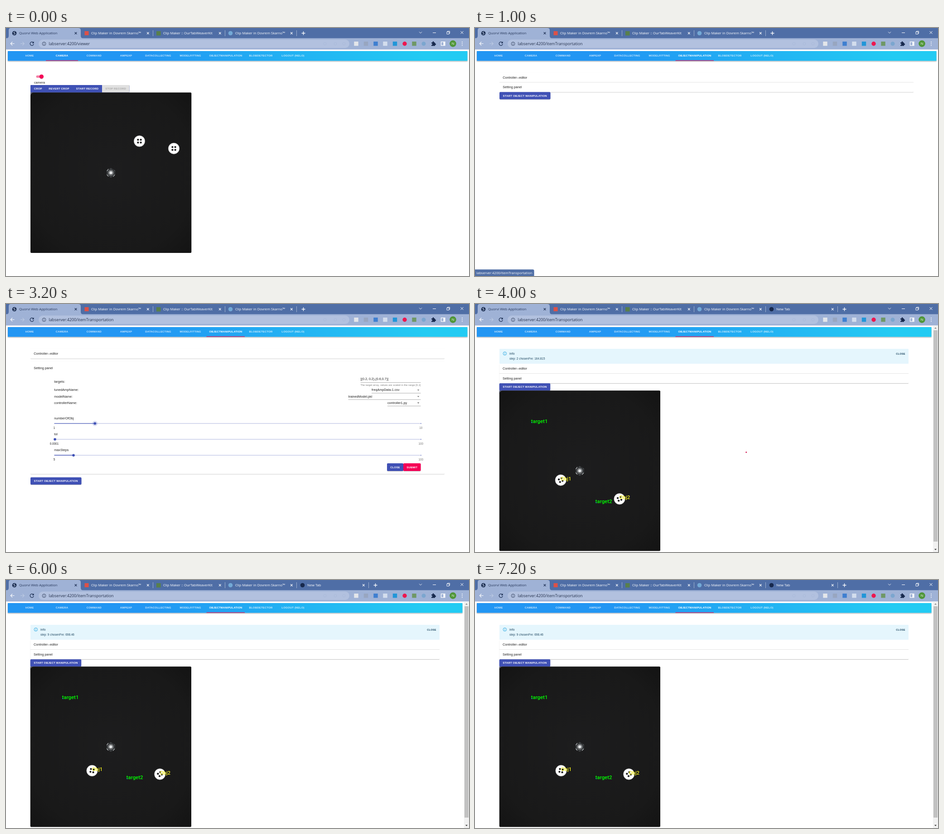
Recreate the animation shown at these times as an HTML page. Size 1022 by 548 pixels, loop 8 s.

```html
<!DOCTYPE html>
<html lang="en">
<head>
<meta charset="utf-8">
<title>Camera control</title>
<style>
html, body { margin: 0; width: 100%; height: 100%; overflow: hidden; background: #fff; }
svg { display: block; width: 100%; height: 100%; }
text { font: 7.2px "Liberation Sans", Arial, sans-serif; fill: #222; white-space: pre; }
.ui { font-family: "Open Sans", "Noto Sans", sans-serif; }
.btn { font-weight: bold; letter-spacing: .03em; text-anchor: middle; }
.mid { text-anchor: middle; }
.mark { font: 500 11.4px Roboto, sans-serif; }
</style>
</head>
<body>
<svg id="stage" viewBox="0 0 1022 548" xmlns="http://www.w3.org/2000/svg">
  <defs>
    <linearGradient id="bar" gradientUnits="userSpaceOnUse" x1="407" y1="165" x2="718" y2="-146">
      <stop stop-color="#2196f3"/><stop offset="1" stop-color="#21cbf3"/>
    </linearGradient>
    <radialGradient id="felt" r=".75">
      <stop stop-color="#1d1d1e"/><stop offset=".7" stop-color="#191919"/><stop offset="1" stop-color="#121212"/>
    </radialGradient>
    <radialGradient id="steel">
      <stop stop-color="#fff"/><stop offset=".35" stop-color="#d5d8da"/>
      <stop offset=".6" stop-color="#77797b"/><stop offset="1" stop-color="#46484a"/>
    </radialGradient>
    <filter id="shade" x="-5%" y="-30%" width="110%" height="190%">
      <feDropShadow dx="0" dy="1.2" stdDeviation="1.1" flood-color="#000" flood-opacity=".38"/>
    </filter>
    <filter id="lift" x="-5%" y="-20%" width="110%" height="150%">
      <feDropShadow dx="0" dy=".7" stdDeviation=".5" flood-color="#000" flood-opacity=".35"/>
    </filter>
  </defs>
  <g id="view"></g>
</svg>
<script>
const BLUE = '#3f51b5', PINK = '#f50057', FRAME = '#4f6ea6', TOOL = '#9fb2d6', NAVY = '#17294d';
const HOST = 'labserver:4200/';

const rect = (x, y, w, h, fill, more = '') =>
  `<rect x="${x}" y="${y}" width="${w}" height="${h}" fill="${fill}" ${more}/>`;
const disc = (x, y, r, fill, more = '') => `<circle cx="${x}" cy="${y}" r="${r}" fill="${fill}" ${more}/>`;
const line = (d, stroke, w = 1, more = '') =>
  `<path d="${d}" fill="none" stroke="${stroke}" stroke-width="${w}" ${more}/>`;
const text = (x, y, s, size = 7.2, fill = '#222', cls = '', more = '') =>
  `<text x="${x}" y="${y}" class="${cls}" style="font-size:${size}px;fill:${fill}" ${more}>${s}</text>`;
const cross = (x, y, r, color, w) => line(`M${x - r} ${y - r}l${2 * r} ${2 * r}m0 ${-2 * r}l${-2 * r} ${2 * r}`, color, w);

function button(x, y, w, h, label, fill = BLUE, color = '#fff', flat) {
  return rect(x, y, w, h, fill, flat ? '' : 'rx="2" filter="url(#lift)"') +
    text(x + w / 2, y + h / 2 + 2, label, 6, color, 'btn');
}

function tabs(extra) {
  const title = (x, s, fill = '#fff') => text(x, 14, s, 7.7, fill, 'ui');
  let out = rect(0, 0, 1022, 23, FRAME) +
    `<path d="M0 23Q6 23 6 17V5Q6 0 11 0H159Q165 0 165 5V17Q165 23 171 23Z" fill="${TOOL}"/>` +
    disc(18.5, 11.5, 4.8, NAVY) + line('M15.5 9.5l3 1 1-2.5M17 14.5l2-2 2.5 .5', '#b9c8e2', 1.2) +
    title(29, 'Quorvi Web Application', '#26375a') + cross(154, 11.5, 2.4, NAVY, 1.1) +
    rect(173.5, 7, 9, 9, '#dc5148') + title(188, 'Clip Maker in Dovrem Skarno™') +
    rect(332, 7, 9.5, 9.5, '#587f4c') + title(347, 'Clip Maker :: OurTabWeaverKit') +
    disc(495.5, 11.5, 4.8, '#73a9d6') + title(506, 'Clip Maker in Dovrem Skarno™');
  if (extra) out += disc(654.5, 11.5, 4.8, NAVY) + title(665, 'New Tab');
  const ends = extra ? [324, 483, 641, 800] : [324, 483, 641];
  for (const x of ends) out += line(`M${x + .5} 5V18`, '#9fb0cf', 1);
  for (const x of ends) out += cross(x - 10.7, 11.5, 2.3, '#fff', 1.1);
  const plus = extra ? 815.5 : 656.5;
  return out + line(`M${plus - 4} 11.5h8m-4 -4v8`, '#fff', 1.4) +
    line('M912 8.5l3 3 3-3', '#fff', .9) + line('M942 10.5h7', '#fff', 1) +
    line('M973 8.5h5v5h-5zM974.5 8.5v-1.5h5v5h-1.5', '#fff', .9) + cross(1006.5, 10, 3, '#fff', 1);
}

function toolbar(path) {
  const ext = [[773, '#e3e6ea'], [794.5, '#98a6c0'], [816, '#3f7fd0'], [837, '#d3dded'], [858.5, '#2196d8'],
    [901, '#6f9866']];
  let out = rect(0, 22.5, 1022, 25, TOOL) + rect(72, 25.5, 686, 18.5, '#b2c1df', 'rx="9.2"') +
    line('M18.5 34.5h-8m3.6-3.8l-3.8 3.8 3.8 3.8', '#fff', 1.2) +
    line('M32 34.5h8m-3.6-3.8l3.8 3.8-3.8 3.8', '#bccae3', 1.1) +
    line('M60.4 32.2a4 4 0 1 0 .7 3.2', NAVY, 1.2) + `<path d="M61.5 29.8v4h-4z" fill="${NAVY}"/>` +
    disc(84, 34.8, 3.9, 'none', 'stroke="#3d4b68"') + line('M84 34v3m0-5v1', '#3d4b68', 1) +
    text(94.5, 38, HOST + path, 8.8, '#26334e', 'ui');
  for (const x of [704, 727, 746]) out += disc(x, 34.8, 3, 'none', 'stroke="#a9b9da" stroke-width=".8"');
  for (const [x, c] of ext) out += rect(x - 4.7, 30, 9.4, 9.4, c);
  out += disc(880, 34.8, 4.7, '#ed174f') + disc(922, 34.8, 4.5, '#7ba6cf') +
    `<path d="M939 32h2.6a1.7 1.7 0 1 1 3 0h2.4v2.4a1.6 1.6 0 1 1 0 3v2.2h-8v-2.4a1.6 1.6 0 1 0 0-3z" fill="${NAVY}"/>` +
    line('M960.5 30.7h8.5v8h-8.5z', '#fff', 1.3) + rect(965.5, 31, 3.4, 7.5, '#fff') +
    disc(986.5, 34.6, 7.3, '#4f9638') + text(986.5, 37.3, 'N', 7.5, '#fff', 'ui mid');
  for (const y of [31, 34.7, 38.4]) out += disc(1007, y, .9, '#fff');
  return out;
}

function nav(active, right) {
  const items = [[52, 'HOME'], [123.5, 'CAMERA'], [194.3, 'COMMAND'], [265, 'AMPEXP'], [336, 'DATACOLLECTING'],
    [407, 'MODELFITTING'], [485, 'OBJECTMANIPULATION'], [562.5, 'BLOBDETECTOR'], [633.5, 'LOGOUT (NELO)']];
  let out = rect(4, 51, right - 4, 21.5, 'url(#bar)', 'filter="url(#shade)"');
  items.forEach(([x, s], i) => {
    out += text(x, 63.3, s, 6, i === active ? '#fff' : 'rgba(255,255,255,.75)', 'btn');
  });
  return out + (active === 1 ? rect(88, 71.3, 71, 1.3, '#d81b60') : rect(442.5, 71.3, 84.5, 1.3, '#d81b60'));
}

function browser(path, active, extra) {
  const bars = extra
    ? rect(1011, 47.5, 11, 500.5, '#f1f1f1') + rect(1012, 58, 9, 467, '#c1c1c1') +
      '<path d="M1014 54.5l2.5-3 2.5 3z" fill="#888"/><path d="M1014 541l2.5 3 2.5-3z" fill="#444"/>'
    : '';
  return rect(0, 0, 1022, 548, '#fff') + tabs(extra) + toolbar(path) + nav(active, extra ? 1007.5 : 1018.5) + bars;
}

const panel = (x, y, w, h) => rect(x, y, w, h, '#fff', 'rx="1.5" filter="url(#lift)"');

function rows(x, y, w) {
  return panel(x, y, w, 43) + line(`M${x} ${y + 21.5}h${w}`, '#dedede', .8) +
    text(x + 7.3, y + 13.3, 'Controller--editor') + text(x + 7.3, y + 34.6, 'Setting panel');
}

const start = (x, y) => button(x, y, 112.5, 16, 'START OBJECT MANIPULATION');

function disk(x, y, turn = 45) {
  let out = disc(x, y, 12.2, '#fdfdfd', 'stroke="#aaa" stroke-width=".6"');
  for (let i = 0; i < 4; i++) {
    const a = (turn + i * 90) * Math.PI / 180;
    out += disc(x + 4.4 * Math.cos(a), y + 4.4 * Math.sin(a), 2.15, '#1b1b1b');
  }
  return out;
}

function video(x, y) {
  const cx = x + 177.5, cy = y + 177.5;
  return rect(x, y, 355.3, 354.5, 'url(#felt)', 'rx="2"') +
    `<path d="M${x} ${y}h7q-6 1-7 7z" fill="#5b5f73"/>` +
    `<path d="M${cx} ${cy - 10.5}l9.2 5.2v10.6l-9.2 5.2-9.2-5.2v-10.6z" fill="#55585a"/>` +
    disc(cx, cy, 9, '#25282a') + disc(cx, cy, 7.4, 'url(#steel)') +
    line(`M${cx - 8.5} ${cy - 4}l3-4.5M${cx + 5} ${cy + 8.5}l3.5-4M${cx - 8.5} ${cy + 4}l3 4`, '#d0d3d5', 1.1) +
    line(`M${cx - 4} ${cy + 3}q4 3 8 0`, '#444', .9);
}

function cameraPage() {
  return browser('viewer', 1, false) +
    rect(66.5, 104.7, 13, 5.2, '#f380a5', 'rx="2.6"') + disc(78.4, 107.3, 4.6, PINK, 'filter="url(#lift)"') +
    text(74, 123.4, 'camera', 7.2, '#222', 'mid') +
    rect(54, 126, 218.5, 16.5, BLUE, 'rx="2" filter="url(#lift)"') +
    button(54.5, 126, 32.5, 16.5, 'CROP', BLUE, '#fff', true) +
    button(87, 126, 60, 16.5, 'REVERT CROP', BLUE, '#fff', true) +
    button(147, 126, 65, 16.5, 'START RECORD', BLUE, '#fff', true) +
    button(212, 126, 60.5, 16.5, 'STOP RECORD', '#e0e0e0', '#a9a9a9', true) +
    video(54, 142.5) + disk(294.5, 250) + disk(370.5, 266.2);
}

const PATH = 'itemTransportation';

function listPage() {
  return browser(PATH, 6, false) + rows(54, 98.5, 914) + start(54, 141.5) +
    `<path d="M0 533.5H127.5Q130.5 533.5 130.5 536.5V548H0Z" fill="${FRAME}"/>` +
    text(3, 543.7, HOST + PATH, 7.6, '#fff', 'ui');
}

function slider(y, name, low, high, x, halo) {
  return text(106.3, y - 9, name) + line(`M106.5 ${y}H916.5`, '#adb4de', 1) + line(`M106.5 ${y}H${x}`, BLUE, 1.2) +
    disc(916, y, .8, BLUE) + (halo ? disc(x, y, 5.8, BLUE, 'opacity=".2"') : '') + disc(x, y, 2.8, BLUE) +
    text(106.5, y + 12, low, 6.3, '#222', 'mid') + text(915.7, y + 12, high, 6.3, '#777', 'mid');
}

function settingsPage() {
  const pick = (x, y, s) => text(x, y, s) + line(`M${x} ${y + 4.6}H915.5`, '#8c8c8c', .7) +
    `<path d="M907.8 ${y - 3.2}h4.6l-2.3 2.3z" fill="#666"/>`;
  return browser(PATH, 6, false) + panel(54, 98.5, 914, 22) + text(61.3, 111.8, 'Controller--editor') +
    panel(54, 126.5, 914, 249) + text(61.3, 143.8, 'Setting panel') +
    text(106.3, 173.5, 'targets:') + text(106.3, 192.4, 'tunedAmpName:') +
    text(106.3, 206.8, 'modelName:') + text(106.3, 220.8, 'controllerName:') +
    text(782.5, 168.3, '[(0.2, 0.2),(0.6,0.7)]') + line('M782.5 173.5H915.5', '#8c8c8c', .7) +
    text(782.5, 180.5, 'The target array, values are scaled in the range [0,1]', 5.35, '#777', '', 'letter-spacing=".17"') +
    pick(807, 192.4, 'freqAmpData-1.csv') + pick(755.5, 206.6, 'trainedModel.pkl') + pick(842, 220.8, 'controller1.py') +
    slider(264, 'numberOfObj', '1', '10', 196.3, true) + slider(299, 'tol', '0.0001', '100', 108) +
    slider(334.2, 'maxSteps', '5', '100', 149) +
    button(841, 352, 36, 17, 'CLOSE') + button(877, 352, 38.5, 17, 'SUBMIT', PINK) + start(54, 383);
}

function runPage(step, freq, objects, pointer) {
  const mark = (x, y, s, color) => text(x, y, s, 11.4, color, 'mark');
  const target = (x, y, s) => mark(x, y, s, '#0f0') + disc(x + 1.3, y - 1, 1.1, '#1979c8');
  let out = browser(PATH, 6, true) + rect(54, 99, 903, 33, '#e5f6fd', 'rx="1.5"') +
    disc(65.8, 109.4, 3.7, 'none', 'stroke="#20a4e0" stroke-width=".9"') + line('M65.8 109v2.4m0-4.3v1', '#20a4e0', .9) +
    text(76, 111.8, 'info', 7.2, '#1d4660') +
    text(76, 123.4, `step: ${step} chosenFre: ${freq}`, 6.3, '#1d4660', '', 'letter-spacing=".07"') +
    text(939.5, 111.7, 'CLOSE', 5.7, '#1d4660', 'btn') +
    rows(53.7, 132, 903.3) + start(53.7, 175.3) + video(53.7, 191.2) +
    target(123.7, 263, 'target1') + target(265.8, 440, 'target2');
  objects.forEach(([x, y, turn], i) => {
    out += disk(x, y, turn) + mark(x - .3, y + .5, 'Obj' + (i + 1), '#f4f01c');
  });
  return out + (pointer ? disc(598.7, 327.7, 1.4, '#d0104a') : '');
}

const scenes = [
  [1000, cameraPage()],
  [2000, listPage()],
  [4000, settingsPage()],
  [6000, runPage(2, '164.815', [[189.2, 389.2, 20], [319, 430.7, 25]], true)],
  [8000, runPage(9, '698.46', [[190, 421.3, 55], [339.7, 429, 10]], false)]
];
const view = document.getElementById('view');
const begin = performance.now();
let shown = null;

function tick() {
  const t = (performance.now() - begin) % 8000;
  const scene = scenes.find(([end]) => t < end);
  if (scene !== shown) {
    shown = scene;
    view.innerHTML = scene[1];
  }
  requestAnimationFrame(tick);
}
tick();
</script>
</body>
</html>
```
